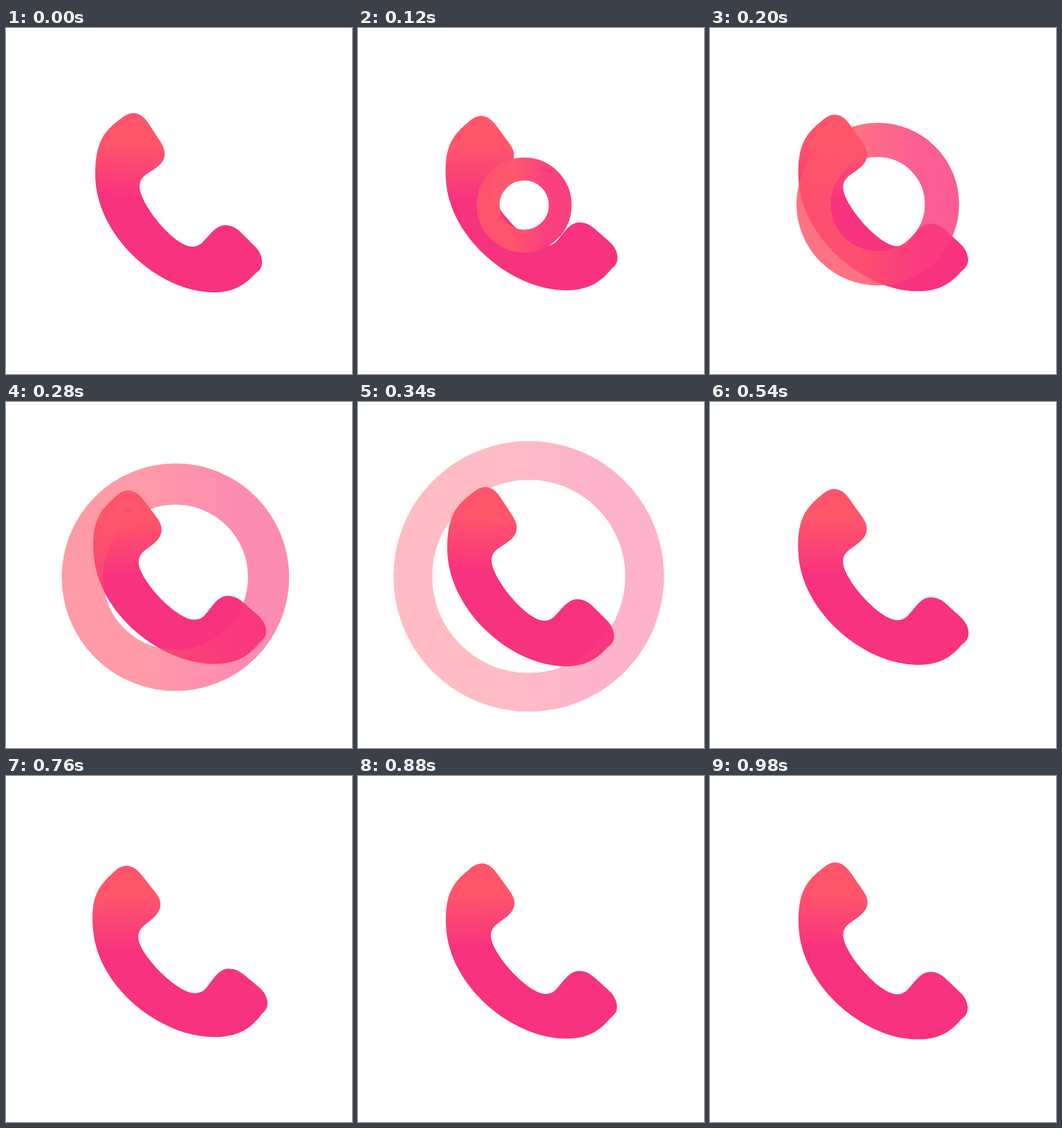
An HTML page for the animation above (1000 ms loop, 500 by 500 pixels).

```html
<!DOCTYPE html>
<html lang="en">
<head>
<meta charset="utf-8">
<title>Ringing phone</title>
<style>
  html, body { margin: 0; width: 100%; height: 100%; overflow: hidden; background: #fff; }
  svg { display: block; width: 100%; height: 100%; }
</style>
</head>
<body>
<svg viewBox="0 0 500 500">
  <defs>
    <linearGradient id="body" gradientUnits="userSpaceOnUse" x1="183" y1="167" x2="178" y2="247">
      <stop offset="0" stop-color="#ff556b"/>
      <stop offset="1" stop-color="#f7327f"/>
    </linearGradient>
    <linearGradient id="wave" x1=".36" x2=".82" y1="0" y2="0">
      <stop offset="0" stop-color="#ff556b"/>
      <stop offset="1" stop-color="#fa3c7e"/>
    </linearGradient>
  </defs>
  <path id="phone" fill="url(#body)" d="M129 212
    C129 168 140 151 162 134 C170 128 175 123 184 123
    C193 123 200 129 206 138 L223 164
    C228 172 230 177 229.300 184 C228 196 216 203 205 210
    C197 215 193 221 193 229
    C193 254 243 316 269 316 C281 316 285 308 292 301
    C300 292 307 285 317 285 C326 285 333 289 340 296
    L360 316 C366 322 370 330 370 338
    C370 346 367 350 360 355 C342 375 324 382 300 382
    C221 382 129 300 129 212Z"/>
  <circle id="ring" fill="none" stroke="url(#wave)"/>
</svg>
<script>
const LOOP = 1000, STEP = 20;
const SWING = 167, LAG = 3, TILT = 6;
const FADE_IN = 83, END = 533;

// [time, radius, speed]
const OUTER = [[0, 0, .52], [200, 117.5, .61], [340, 195.5, .48], [400, 215, .14], [END, 221.5, 0]];
const INNER = [[0, 0, .22], [200, 68, .44], [340, 139.5, .66], [400, 182, .66], [END, 221.5, 0]];

const phone = document.getElementById('phone');
const ring = document.getElementById('ring');
const clamp = x => Math.min(1, Math.max(0, x));
const smooth = u => u * u * (3 - 2 * u);

// Cubic Hermite curve through the keys
function curve(keys, t) {
  let i = 0;
  while (i < keys.length - 2 && t >= keys[i + 1][0]) i++;
  const [ta, a, va] = keys[i], [tb, b, vb] = keys[i + 1];
  const h = tb - ta, u = clamp((t - ta) / h), s = smooth(u);
  return a * (1 - s) + b * s + h * u * (1 - u) * (va * (1 - u) - vb * u);
}

function setAttrs(el, attrs) {
  for (const name in attrs) el.setAttribute(name, attrs[name]);
}

function draw(t) {
  const phase = ((t - LAG + SWING) % SWING) / SWING;
  const swing = 1 - Math.abs(1 - 2 * phase);
  phone.setAttribute('transform', `rotate(${0.2 - TILT * swing} 250 250)`);

  const visible = t > 0 && t < END;
  ring.style.display = visible ? '' : 'none';
  if (!visible) return;
  const outer = curve(OUTER, t), inner = curve(INNER, t);
  const r = (outer + inner) / 2;
  setAttrs(ring, {
    cx: 237.2 + .057 * r,
    cy: 257.6 - .033 * r,
    r,
    'stroke-width': outer - inner,
    opacity: 1 - smooth(clamp((t - FADE_IN) / (END - FADE_IN)))
  });
}

const start = performance.now();
function tick() {
  const t = (performance.now() - start) % LOOP;
  draw(Math.floor(t / STEP) * STEP);
  requestAnimationFrame(tick);
}
tick();
</script>
</body>
</html>
```
